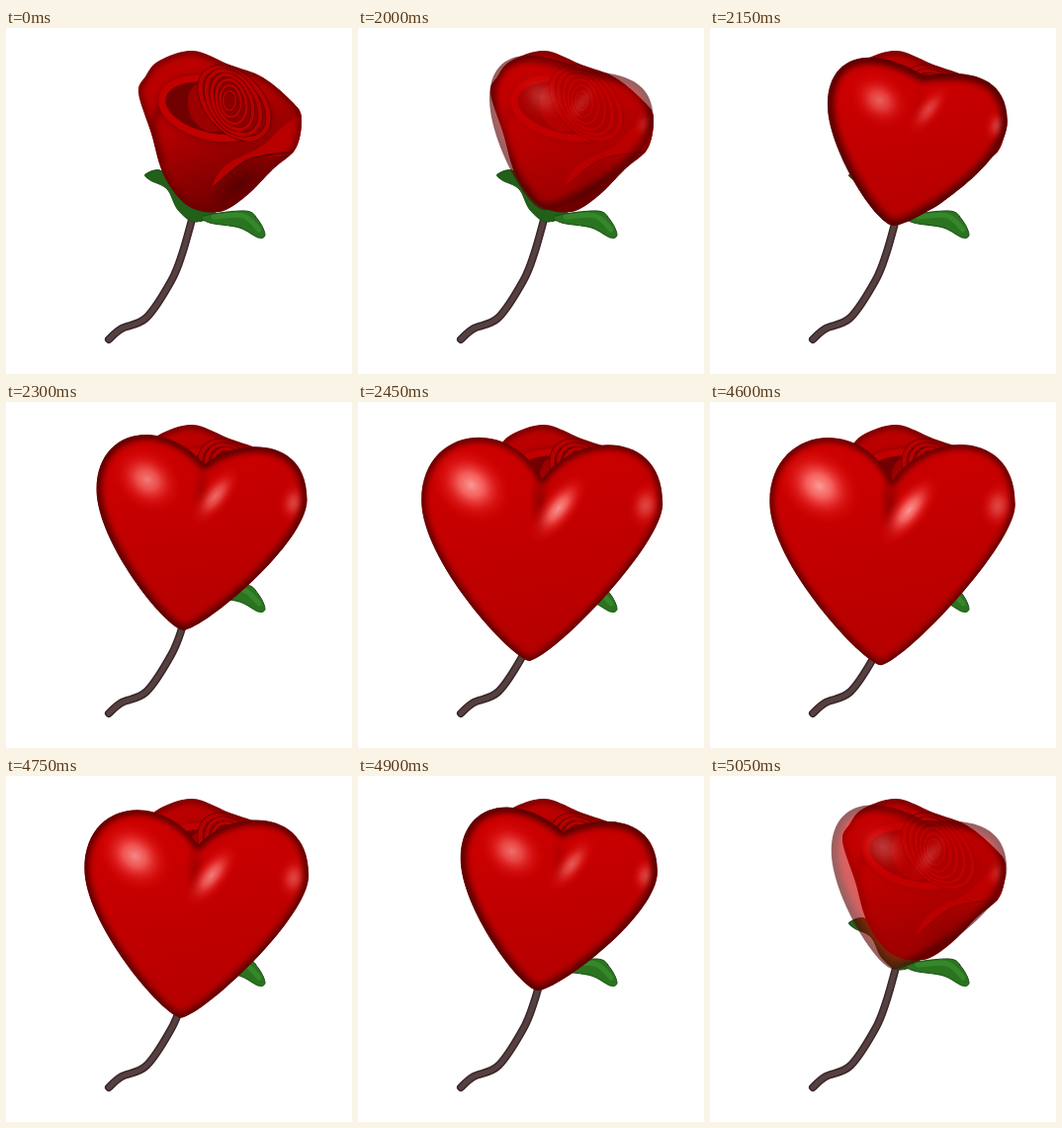
These frames come from a looping animation (350 by 350 pixels, 5200 ms). An HTML page:

```html
<!DOCTYPE html>
<html lang="en">
<head>
<meta charset="utf-8">
<title>Rose and heart</title>
<style>
html, body { margin: 0; width: 100%; height: 100%; overflow: hidden; background: #fff; }
svg { display: block; width: 350px; height: 350px; }
path { stroke-linecap: round; stroke-linejoin: round; }
</style>
</head>
<body>
<svg viewBox="0 0 350 350">
  <defs>
    <filter id="soft" x="-50%" y="-50%" width="200%" height="200%"><feGaussianBlur stdDeviation="3"/></filter>
    <radialGradient id="shine">
      <stop offset="0" stop-color="#ffa6a2"/>
      <stop offset=".3" stop-color="#ff7874" stop-opacity=".85"/>
      <stop offset=".65" stop-color="#f03030" stop-opacity=".4"/>
      <stop offset="1" stop-color="#d80000" stop-opacity="0"/>
    </radialGradient>
    <radialGradient id="shade">
      <stop offset="0" stop-color="#500000"/>
      <stop offset="1" stop-color="#500000" stop-opacity="0"/>
    </radialGradient>
    <linearGradient id="skin" x2=".25" y2="1">
      <stop offset="0" stop-color="#d00000"/>
      <stop offset="1" stop-color="#b60000"/>
    </linearGradient>
    <linearGradient id="body" x2=".4" y2="1">
      <stop offset="0" stop-color="#c00000"/>
      <stop offset=".5" stop-color="#b20000"/>
      <stop offset="1" stop-color="#740000"/>
    </linearGradient>
    <clipPath id="bloomClip"><path id="bloomShape"/></clipPath>
    <clipPath id="heartClip"><path id="heartShape"/></clipPath>
  </defs>
  <g id="plant"></g>
  <g id="bloom" clip-path="url(#bloomClip)"></g>
  <g id="heart" clip-path="url(#heartClip)">
    <path id="heartFill" fill="url(#skin)"/>
    <g id="lights"></g>
    <path id="heartEdge" fill="none" stroke="#580000" filter="url(#soft)"/>
  </g>
</svg>
<script>
const $ = id => document.getElementById(id);
const toPoints = s => s.split(' ').map(q => q.split(',').map(Number));
const mix = (a, b, p) => a + (b - a) * p;

// Catmull-Rom spline through the points
function spline(s, closed) {
  const pts = toPoints(s), n = pts.length;
  const at = i => pts[closed ? (i + n) % n : Math.max(0, Math.min(n - 1, i))];
  let d = 'M' + pts[0];
  for (let i = 0; i < n - !closed; i++) {
    const [a, b, c, e] = [at(i - 1), at(i), at(i + 1), at(i + 2)];
    const c1 = b.map((v, k) => v + (c[k] - a[k]) / 6);
    const c2 = c.map((v, k) => v - (e[k] - b[k]) / 6);
    d += `C${c1} ${c2} ${c}`;
  }
  return d;
}

function set(el, attrs) {
  for (const k in attrs) el.setAttribute(k, attrs[k]);
  return el;
}
const add = (parent, tag, attrs) =>
  set($(parent).appendChild(document.createElementNS('http://www.w3.org/2000/svg', tag)), attrs);
const area = (parent, s, fill, more) => add(parent, 'path', { d: spline(s, true), fill, ...more });
const line = (parent, s, stroke, width, more) =>
  add(parent, 'path', { d: spline(s), fill: 'none', stroke, 'stroke-width': width, ...more });
const ellipse = (parent, x, y, rx, ry, angle, fill, more) =>
  add(parent, 'ellipse', { rx, ry, fill, transform: `translate(${x} ${y}) rotate(${angle})`, ...more });
const soft = { filter: 'url(#soft)' };

// Stem and leaves
const stem = '188,194 178,229 167,256 142,293 117,304 104,315';
line('plant', stem, '#38262a', 8);
line('plant', stem, '#56403f', 5);
const leafEdge = { stroke: '#1a4c14', 'stroke-width': 1 };
area('plant', '141,148 158,145 176,172 212,187 191,196 174,184 163,163 146,154', '#22601a', leafEdge);
area('plant', '200,190 242,185 255,194 262,209 255,212 236,202 206,197', '#2a7420', leafEdge);
line('plant', '210,191 240,190 256,204', '#3c9130', 5, { opacity: .7 });

// Bloom: outer petals, the cup, the nested centre and the curled front petal
const outline = '134,66 141,49 155,33 189,23 226,37 260,50 291,76 299,92 293,122 270,143 243,170 216,186 184,180 160,150 147,107';
$('bloomShape').setAttribute('d', spline(outline, true));
area('bloom', outline, 'url(#body)');
line('bloom', '158,78 149,98 156,135', '#780000', 5, soft);
ellipse('bloom', 212, 82, 58, 33, 12, '#780000', soft);
ellipse('bloom', 210, 81, 53, 29, 12, '#720000', { stroke: '#c20000', 'stroke-width': 7 });
ellipse('bloom', 205, 80, 20, 26, -25, '#9c0000');
for (let i = 0; i < 6; i++) {
  const size = 1 - i / 6.5;
  ellipse('bloom', 231 - i, 76 - i / 2, 42 * size, 27 * size, 48 + 9 * i, '#8c0000',
    { stroke: '#600000', 'stroke-width': 6 - i * .6 });
  ellipse('bloom', 231 - i, 76 - i / 2, 42 * size, 27 * size, 48 + 9 * i, 'none',
    { stroke: '#b80000', 'stroke-width': 4.5 - i * .5 });
}
ellipse('bloom', 235, 158, 38, 18, -40, 'url(#shade)', { opacity: .8 });
area('bloom', '301,88 294,125 246,133 210,161 222,139 258,120 280,100', '#b80000');
line('bloom', '294,125 246,133 210,161', '#680000', 2);
area('bloom', outline, 'none', { stroke: '#680000', 'stroke-width': 7, ...soft });

// Heart outlines as cubic curves: notch, right side, tip, left side, notch
const small = toPoints('223,40 250,48 298,42 299,92 299,140 205,187 188,184 170,182 133,112 133,72 133,28 165,16');
const large = toPoints('179,86 215,25 310,25 310,103 315,140 200,270 171,278 152,276 50,170 50,105 50,25 150,12');
function heartPath(p) {
  const pts = small.map((q, i) => q.map((v, k) => mix(v, large[i][k], p)));
  return `M${pts[0]}C${pts.slice(1).join(' ')} ${pts[0]}Z`;
}

// Each light travels from one spot to another while it grows
const lights = [
  { from: [218, 72], to: [177, 108], size: [12, 38], angle: 0, paint: 'shade', faint: 0, full: .5 },
  { from: [186, 70], to: [100, 87], size: [48, 38], angle: 38, paint: 'shine', faint: .5, full: 1 },
  { from: [226, 76], to: [198, 114], size: [46, 20], angle: -52, paint: 'shine', faint: .3, full: 1 },
  { from: [291, 98], to: [291, 106], size: [21, 28], angle: 10, paint: 'shine', faint: .4, full: .45 }
];
for (const l of lights) l.el = add('lights', 'ellipse', { fill: `url(#${l.paint})` });

// Growth of the heart: four steps up, a pause, five steps down
const frame = 150, grow = 2000, shrink = 4600, loop = 5200;
const ease = x => x - .08 * Math.sin(2 * Math.PI * x);
const stepsSince = (t, start) => Math.floor((t - start) / frame);
function growth(t) {
  if (t < shrink) return ease(Math.min(1, stepsSince(t, grow) / 4));
  return 1 - ease((stepsSince(t, shrink) + 1) / 5);
}

function draw() {
  const t = performance.now() % loop;
  const p = growth(Math.max(t, grow));
  const d = heartPath(p);
  for (const id of ['heartShape', 'heartFill', 'heartEdge']) set($(id), { d });
  set($('heartEdge'), { 'stroke-width': mix(14, 7, p) });
  for (const { from, to, size, angle, faint, full, el } of lights) {
    const [x, y] = from.map((v, k) => mix(v, to[k], p));
    set(el, {
      rx: size[0], ry: size[1], opacity: mix(faint, full, p),
      transform: `translate(${x} ${y}) rotate(${angle}) scale(${mix(.65, 1, p)})`
    });
  }
  set($('heart'), { opacity: t < grow ? 0 : p < .16 ? .62 : 1 });
  requestAnimationFrame(draw);
}
draw();
</script>
</body>
</html>
```
